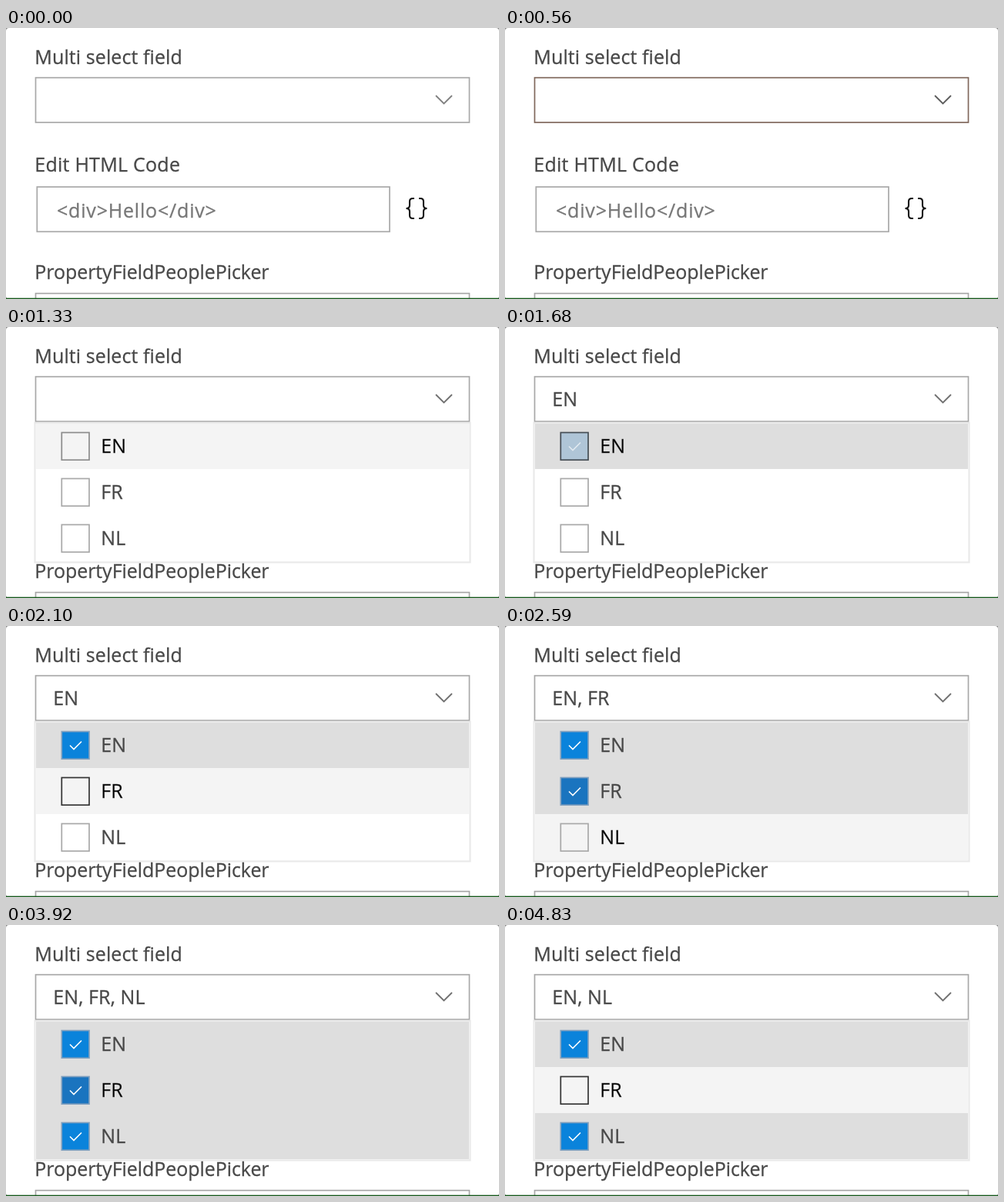
An HTML page that plays this animation: 640 by 353 pixels, repeating every 4.97 s.

```html
<!DOCTYPE html>
<html lang="en">
<head>
<meta charset="utf-8">
<title>Multi select field</title>
<style>
  html, body { margin: 0; width: 100%; height: 100%; overflow: hidden; background: #fff; }
  svg { display: block; width: 100%; height: 100%; }
  text {
    font: 25px "Open Sans", "Noto Sans", sans-serif; letter-spacing: .1px;
    fill: #484848; stroke: #484848; stroke-width: .3;
  }
  .frame { fill: #fff; stroke: #a8a8a8; stroke-width: 1.7; }
  .line { fill: none; stroke-width: 1.8; }
  .code { fill: #777; stroke: #777; letter-spacing: .8px; }
  .edge { stroke-width: 1.7; stroke: #a8a8a8; }
  .check { fill: none; stroke: #fff; stroke-width: 1.6; opacity: 0; }
  .value { opacity: 0; }

  /* One shared clock: 4970 ms per loop */
  .field, .chevron, .value, .menu, .row * { animation: 4970ms infinite step-end; }
  .field { animation-name: field; }
  .chevron { animation-name: chevron; }
  .menu { animation-name: slide, appear; animation-timing-function: cubic-bezier(.1, .9, .2, 1), linear; }
  .row .edge, .row .check { animation-timing-function: ease-in-out; }

  @keyframes field { 0% { stroke: #a8a8a8 } 1.4% { stroke: #80685c } 25.35%, 100% { stroke: #a8a8a8 } }
  @keyframes chevron { 0% { stroke: #808080 } 1.4% { stroke: #5c5c5c } 25.35%, 100% { stroke: #707070 } }
  @keyframes slide { 0%, 15.49% { transform: translateY(-10px) } 22.88%, 100% { transform: none } }
  @keyframes appear { 0%, 15.49% { opacity: 0 } 18%, 100% { opacity: 1 } }

  .v1 { animation-name: v1; }
  .v2 { animation-name: v2; }
  .v3 { animation-name: v3; }
  .v4 { animation-name: v4; }
  @keyframes v1 { 0% { opacity: 0 } 32.39% { opacity: 1 } 46.47%, 100% { opacity: 0 } }
  @keyframes v2 { 0% { opacity: 0 } 46.47% { opacity: 1 } 59.15%, 100% { opacity: 0 } }
  @keyframes v3 { 0% { opacity: 0 } 59.15% { opacity: 1 } 83.09%, 100% { opacity: 0 } }
  @keyframes v4 { 0% { opacity: 0 } 83.09%, 100% { opacity: 1 } }

  .en .bg { animation-name: en-bg; }
  .en text { animation-name: en-text; }
  .en .edge { animation-name: en-edge; }
  .en .check { animation-name: en-check; }
  @keyframes en-bg { 0% { fill: #f4f4f4 } 32.39%, 100% { fill: #dedede } }
  @keyframes en-text { 0% { fill: #484848 } 25.35% { fill: #000 } 38.02%, 100% { fill: #484848 } }
  @keyframes en-edge {
    0%, 25.35% { fill: #1a74bf00; stroke: #a8a8a8 }
    29.57%, 32.39% { fill: #1a74bf00; stroke: #333 }
    36.62%, 38.02% { fill: #1a74bf; stroke: #7f9fbe }
    42.25%, 100% { fill: #0a83db; stroke: #7f9fbe }
  }
  @keyframes en-check { 0%, 32.38% { opacity: 0 } 32.39% { opacity: .5 } 36.62%, 100% { opacity: 1 } }

  .fr .bg { animation-name: fr-bg; }
  .fr text { animation-name: fr-text; }
  .fr .edge { animation-name: fr-edge; }
  .fr .check { animation-name: fr-check; }
  @keyframes fr-bg {
    0% { fill: #fff } 38.02% { fill: #f4f4f4 } 46.47% { fill: #dedede } 83.09%, 100% { fill: #f4f4f4 }
  }
  @keyframes fr-text {
    0% { fill: #484848 } 38.02% { fill: #000 } 52.11% { fill: #484848 } 74.64%, 100% { fill: #000 }
  }
  @keyframes fr-edge {
    0%, 38.02% { fill: #1a74bf00; stroke: #a8a8a8 }
    42.25%, 46.47% { fill: #1a74bf00; stroke: #333 }
    50.7%, 52.11% { fill: #1a74bf; stroke: #7f9fbe }
    56.33%, 74.64% { fill: #0a83db; stroke: #7f9fbe }
    78.87%, 83.09% { fill: #1a74bf; stroke: #7f9fbe }
    87.32%, 100% { fill: #1a74bf00; stroke: #333 }
  }
  @keyframes fr-check {
    0%, 46.46% { opacity: 0 } 46.47% { opacity: .5 } 50.7%, 83.09% { opacity: 1 } 87.32%, 100% { opacity: 0 }
  }

  .nl .bg { animation-name: nl-bg; }
  .nl text { animation-name: nl-text; }
  .nl .edge { animation-name: nl-edge; }
  .nl .check { animation-name: nl-check; }
  @keyframes nl-bg { 0% { fill: #fff } 52.11% { fill: #f4f4f4 } 59.15%, 100% { fill: #dedede } }
  @keyframes nl-text { 0% { fill: #484848 } 52.11% { fill: #000 } 74.64%, 100% { fill: #484848 } }
  @keyframes nl-edge {
    0%, 52.11% { fill: #1a74bf00; stroke: #a8a8a8 }
    56.33%, 59.15% { fill: #1a74bf00; stroke: #333 }
    63.38%, 74.64% { fill: #1a74bf; stroke: #7f9fbe }
    78.87%, 100% { fill: #0a83db; stroke: #7f9fbe }
  }
  @keyframes nl-check { 0%, 59.14% { opacity: 0 } 59.15% { opacity: .5 } 63.38%, 100% { opacity: 1 } }
</style>
</head>
<body>
<svg viewBox="0 0 640 353">
  <rect width="640" height="353" fill="#8a8a8a"/>
  <rect width="640" height="353" rx="4" fill="#fff"/>

  <text x="37.3" y="46.5">Multi select field</text>
  <text x="37.3" y="187" style="letter-spacing:.25px">Edit HTML Code</text>
  <rect class="frame" x="40.3" y="207" width="457.7" height="58.3"/>
  <text class="code" x="66" y="247.3">&lt;div&gt;Hello&lt;/div&gt;</text>
  <g class="line" stroke="#111" style="stroke-width:2.1">
    <path d="M530 222h-2q-4 0-4 4v5q0 4-4.500 4q4.500 0 4.500 4v5q0 4 4 4h2"/>
    <path d="M536 222h2q4 0 4 4v5q0 4 4.500 4q-4.500 0-4.500 4v5q0 4-4 4h-2"/>
  </g>
  <rect class="frame" x="38.5" y="345.7" width="563" height="30"/>

  <rect class="frame field" x="38.5" y="64.7" width="563" height="58.3"/>
  <path class="line chevron" d="M558 88l10.500 10.500L579 88"/>
  <text class="value v1" x="61.3" y="103">EN</text>
  <text class="value v2" x="61.3" y="103">EN, FR</text>
  <text class="value v3" x="61.3" y="103">EN, FR, NL</text>
  <text class="value v4" x="61.3" y="103">EN, NL</text>

  <g class="menu">
    <rect x="37.5" y="124.8" width="565" height="181.700" fill="#fff" stroke="#e9e9e9" stroke-width="2.2"/>
    <g class="row en">
      <rect class="bg" x="39" y="126" width="562" height="59"/>
      <rect class="edge" x="72.3" y="137.5" width="35.7" height="35.7"/>
      <path class="check" d="M83 155.500l5 5 10-10"/>
      <text x="123.3" y="164">EN</text>
    </g>
    <g class="row fr" transform="translate(0 60)">
      <rect class="bg" x="39" y="125" width="562" height="60"/>
      <rect class="edge" x="72.3" y="137.5" width="35.7" height="35.7"/>
      <path class="check" d="M83 155.500l5 5 10-10"/>
      <text x="123.3" y="164">FR</text>
    </g>
    <g class="row nl" transform="translate(0 120)">
      <rect class="bg" x="39" y="125" width="562" height="60"/>
      <rect class="edge" x="72.3" y="137.5" width="35.7" height="35.7"/>
      <path class="check" d="M83 155.500l5 5 10-10"/>
      <text x="123.3" y="164">NL</text>
    </g>
  </g>

  <text x="37.3" y="327" style="letter-spacing:-.06px">PropertyFieldPeoplePicker</text>
  <rect y="351.7" width="640" height="1.3" fill="#14581a"/>
</svg>
</body>
</html>
```
